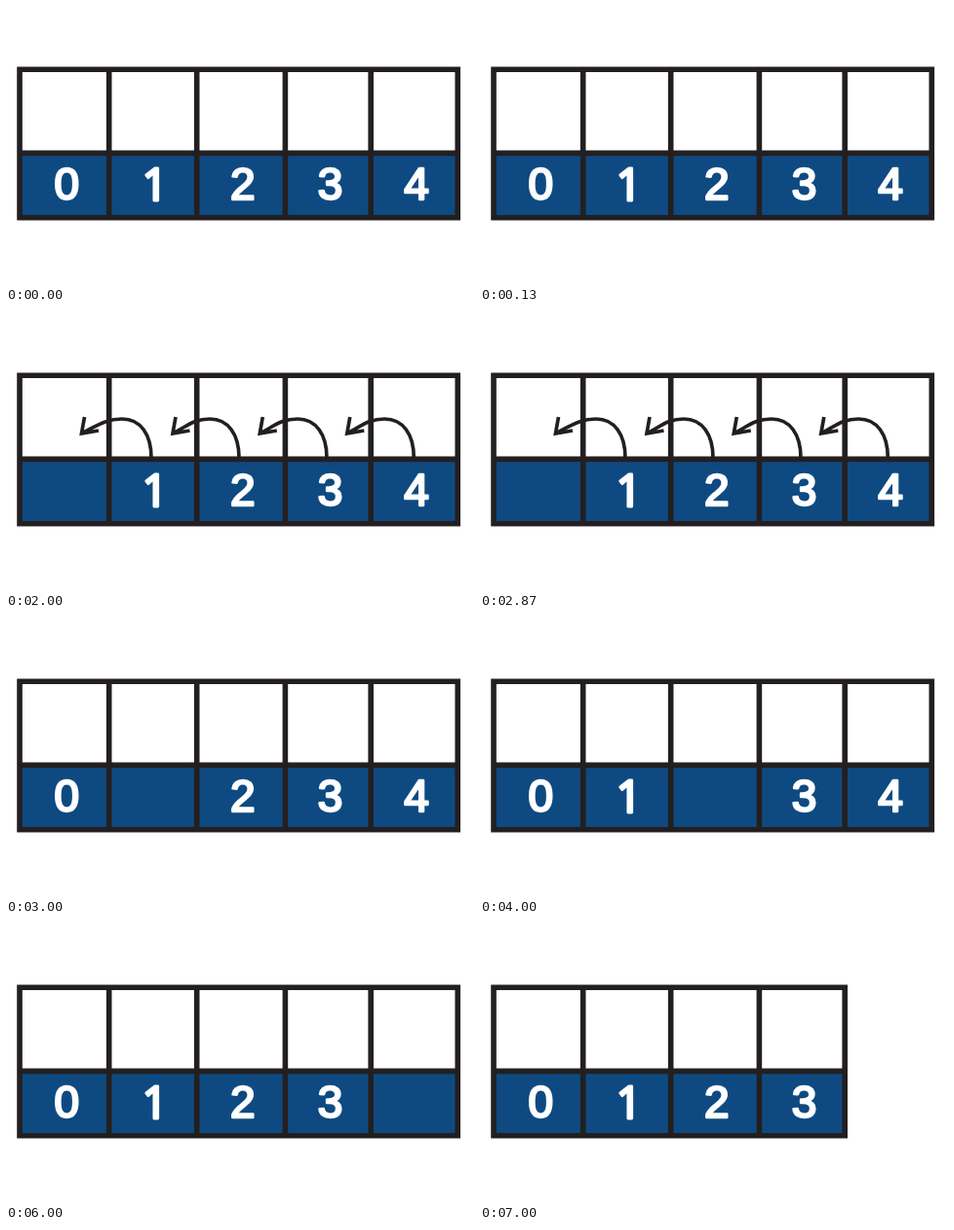
These frames come from a looping animation (480 by 286 pixels, 7990 ms). An HTML page:

```html
<!DOCTYPE html>
<html lang="en">
<head>
<meta charset="utf-8">
<title>Removing an array element</title>
<style>
  html, body { margin: 0; width: 100%; height: 100%; overflow: hidden; background: #fff; }
  svg { display: block; width: 100vw; height: 100vh; }
  text {
    font: 46px "Liberation Sans", Arial, sans-serif;
    text-anchor: middle;
    fill: #fff;
    stroke: #fff;
    stroke-width: 2.5;
    stroke-linejoin: round;
  }
  .one { font: 45px "Noto Sans", "Open Sans", sans-serif; stroke-width: 2.8; }
  .grid { fill: none; stroke: #231f20; stroke-width: 5.6; }
  .arrow { fill: none; stroke: #231f20; stroke-width: 3.7; }
</style>
</head>
<body>
<svg id="stage" viewBox="0 0 480 286"></svg>
<script>
const LOOP = 7990;
const TOP = 65.2, MIDDLE = 151.4, BOTTOM = 217.8;
const edges = [14, 105.7, 195.7, 286.4, 374.2, 463.3];
const digitX = [62.2, 152.7, 242.8, 332.5, 421.1];
const arrowEnds = [[149, 77.5], [239, 171], [329, 260.3], [418.3, 349.8]];

const stage = document.getElementById("stage");

function add(tag, attrs, parent = stage, text = "") {
  const node = document.createElementNS("http://www.w3.org/2000/svg", tag);
  for (const name in attrs) node.setAttribute(name, attrs[name]);
  node.textContent = text;
  return parent.appendChild(node);
}

function show(node, visible) {
  node.setAttribute("visibility", visible ? "visible" : "hidden");
}

const band = add("rect", { x: edges[0], y: MIDDLE, height: BOTTOM - MIDDLE, fill: "#0e4a81" });
const grid = add("path", { class: "grid" });

function drawGrid(count) {
  const left = edges[0], right = edges[count];
  const dividers = edges.slice(1, count).map(x => `M${x} ${TOP}V${BOTTOM}`).join("");
  band.setAttribute("width", right - left);
  grid.setAttribute("d",
    `M${left} ${TOP}H${right}V${BOTTOM}H${left}ZM${left} ${MIDDLE}H${right}${dividers}`);
}

const digits = digitX.map((x, i) =>
  add("text", { x, y: i === 1 ? 199.8 : 198.9, class: i === 1 ? "one" : "digit" }, stage, String(i)));

const arrows = add("g", { class: "arrow" });
for (const [start, tip] of arrowEnds) {
  add("path", {
    d: `M${start} 150C${start} 126 ${start - 11} 110 ${start - 30} 110` +
       `C${start - 47} 110 ${tip + 14} 118 ${tip} 125` +
       `M${tip + 3} 108L${tip} 125L${tip + 17.5} 122`
  }, arrows);
}

// Number of the empty cell in each second, -1 for none.
const emptyBySecond = [-1, 0, 0, 1, 2, 3, 4, 4];

function draw(time) {
  const second = Math.floor((time % LOOP) / 1000);
  drawGrid(second < 7 ? 5 : 4);
  digits.forEach((digit, i) => show(digit, i !== emptyBySecond[second]));
  show(arrows, second === 2);
}

const begin = performance.now();
function tick(now) {
  draw(Math.max(0, now - begin));
  requestAnimationFrame(tick);
}
draw(0);
requestAnimationFrame(tick);
</script>
</body>
</html>
```
